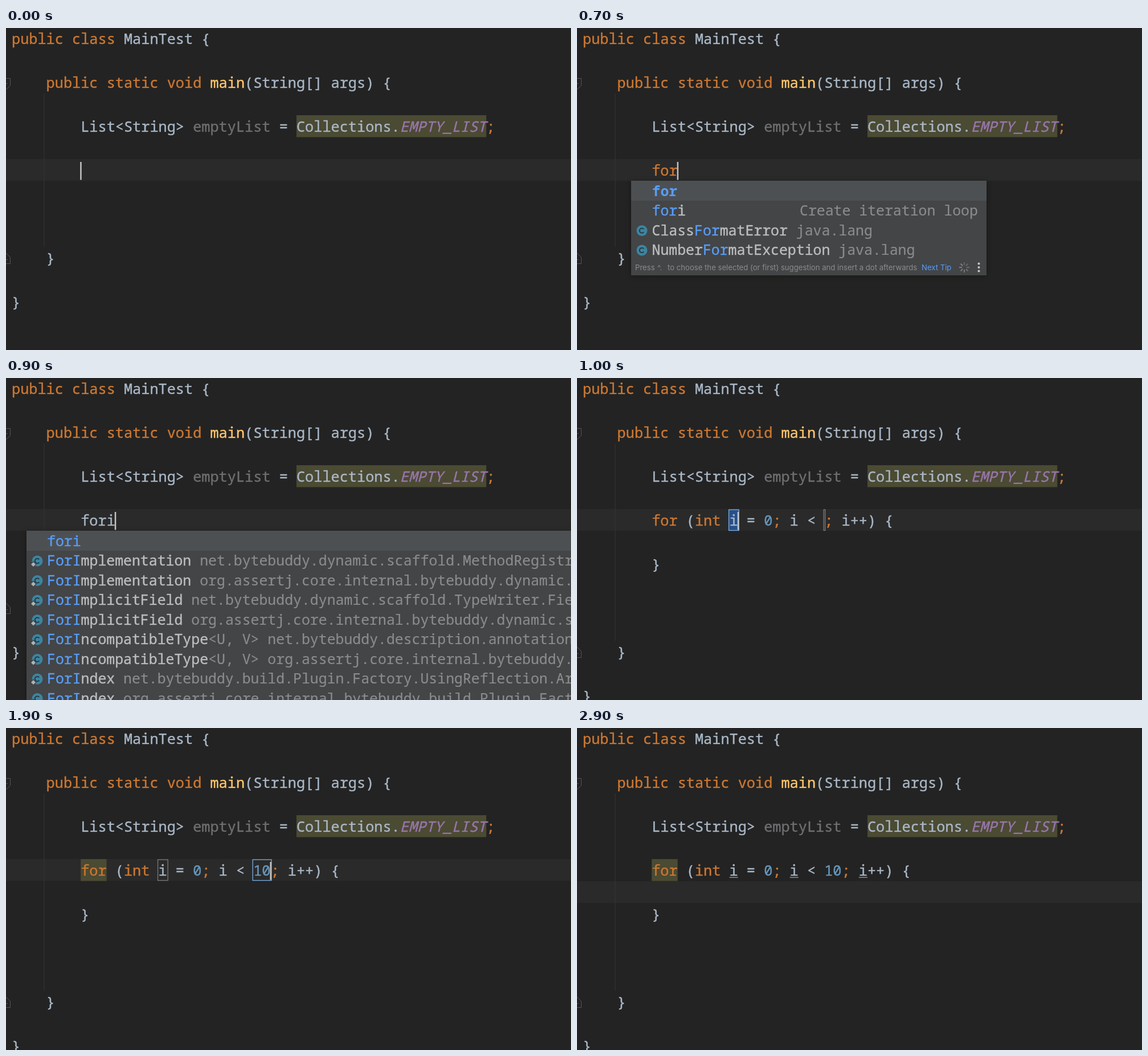
Recreate the animation shown at these times as an HTML page. Size 992 by 565 pixels, loop 3000 ms.

```html
<!DOCTYPE html>
<html lang="en">
<head>
<meta charset="utf-8">
<title>Typing a for loop</title>
<style>
  html, body { margin: 0; width: 100%; height: 100%; overflow: hidden; background: #232323; }
  svg { display: block; width: 992px; height: 565px; }
  text {
    white-space: pre; font: 25.25px "Noto Sans Mono", "DejaVu Sans Mono", monospace; font-variant-ligatures: none;
    color: #a9b7c6; fill: currentColor; stroke: currentColor; stroke-width: .4px;
  }
  .key { color: #cc7832; }
  .name { color: #ffc66d; }
  .unused { color: #6e6f71; }
  .num { color: #6897bb; }
  .const { color: #9876aa; font-style: italic; }
  .item { font-size: 24.83px; color: #bbbdbf; }
  .hit { color: #589df6; }
  .bold { font-weight: 700; stroke: none; }
  .dim { color: #8a8b8c; stroke-width: .2px; }
  .tip { font: 13.15px Inter, "Liberation Sans", sans-serif; color: #8a8b8c; stroke: none; }
  .link { color: #589df6; }
  .panel { filter: drop-shadow(0 1px 4px #0005); }
</style>
</head>
<body>
<svg id="stage" viewBox="0 0 992 565"></svg>
<script>
const LOOP = 3000;
const COL = 15.15, ROW = 38.5, ITEM_COL = 14.9;
const stage = document.getElementById('stage');

const colX = c => 10 + c * COL;
const rowY = r => Math.round(r * ROW - 1);
const esc = s => s.replace(/&/g, '&amp;').replace(/</g, '&lt;');
const rect = (x, y, w, h, fill, extra = '') =>
  `<rect x="${x}" y="${y}" width="${w}" height="${h}" fill="${fill}" ${extra}/>`;
const path = (d, stroke, width = 1) =>
  `<path d="${d}" fill="none" stroke="${stroke}" stroke-width="${width}"/>`;
const text = (x, y, s, cls = '') => `<text x="${x}" y="${y}" class="${cls}">${esc(s)}</text>`;

// Each run is [column, text, class].
const code = (row, ...runs) =>
  runs.map(([c, s, cls]) => text(colX(c), rowY(row) + 28.5, s, cls)).join('');
const mark = (row, c, n) => rect(colX(c), rowY(row), n * COL, ROW, '#4b4a33');
const caret = (row, c) => rect(colX(c) - 1, rowY(row) + 5, 2.5, 31.5, '#c4c4c4');
const field = (c, n, stroke, fill = 'none') =>
  rect(colX(c) - 1, rowY(6) + 1, n * COL + 2.5, ROW - 2, fill, `stroke="${stroke}" stroke-width="1.3"`);

function page(s) {
  const end = s.loop ? 12 : 10;
  const y = rowY(end);
  return rect(0, 0, 992, 565, '#232323') +
    rect(0, rowY(s.line || 6), 992, 38, '#2a2a2a') +
    path(`M67 ${rowY(3)}V${y}`, '#353535') +
    path('M0 88.5H7.5V101L0 108M0 97.5H3', '#555') +
    path(`M0 ${y + 11}L7.5 ${y + 18.5}V${y + 29.5}H0M0 ${y + 22.5}H3`, '#555') +
    code(0, [0, 'public class', 'key'], [13, 'MainTest {']) +
    code(2, [4, 'public static void', 'key'], [23, 'main', 'name'], [27, '(String[] args) {']) +
    mark(4, 33, 22) +
    code(4, [8, 'List<String>'], [21, 'emptyList', 'unused'], [31, '='],
      [33, 'Collections.'], [45, 'EMPTY_LIST', 'const'], [55, ';', 'key']) +
    code(end, [4, '}']) + code(end + 2, [0, '}']);
}

function forLoop(s) {
  const n = s.limit.length, after = 28 + n;
  const blue = '#78aee0', grey = '#797b7d';
  let out = s.warn ? mark(6, 8, 3) : '';
  if (s.slot === 1) out += field(17, 1, blue, '#27508a') + field(28, n, grey);
  if (s.slot === 2) out += field(17, 1, grey) + field(28, n, blue);
  out += code(6, [8, 'for', 'key'], [12, '('], [13, 'int', 'key'], [17, 'i ='], [21, '0', 'num'],
    [22, ';', 'key'], [24, 'i <'], [28, s.limit, 'num'], [after, ';', 'key'], [after + 2, 'i++) {']);
  if (s.warn && !n) out += path('M419 262.5l3.5 3 3.5-3 3.5 3 2.5-2.5', '#b5622b', 1.4);
  if (s.under) for (const c of [17, 24, after + 2])
    out += rect(colX(c), 261.5, COL, 1.3, '#929eab');
  return out + code(8, [8, '}']);
}

const classIcon = (x, y, nested) =>
  `<circle cx="${x}" cy="${y}" r="9.5" fill="#3d84a0"/>` +
  path(`M${x + 3.3} ${y - 2.6}a4.2 4.2 0 1 0 0 5.2`, '#25343c', 1.8) +
  (nested ? `<path d="M${x - 7} ${y + 1}l5 5-5 5-5-5z" fill="#aeb4b8" stroke="#434547" stroke-width="1.5"/>` : '');

// Each part of an entry is [text, class]; parts follow one another.
function entry(x, i, parts) {
  let n = 0;
  return parts.map(([s, cls = '']) => {
    const out = text(x + n * ITEM_COL, 294.7 + 34.5 * i, s, 'item ' + cls);
    n += s.length;
    return out;
  }).join('');
}

function panel(x, w, h) {
  return rect(x, 268, w, h, '#434547', 'class="panel"') + rect(x, 268, w, 35, '#4d5053');
}

function shortList() {
  let out = panel(95, 624, 166) +
    entry(131.5, 0, [['for', 'hit bold']]) +
    entry(131.5, 1, [['for', 'hit'], ['i']]) +
    entry(391, 1, [['Create iteration loop', 'dim']]) +
    entry(131.5, 2, [['Class'], ['For', 'hit'], ['matError '], ['java.lang', 'dim']]) +
    entry(131.5, 3, [['Number'], ['For', 'hit'], ['matException '], ['java.lang', 'dim']]) +
    classIcon(114, 355.5) + classIcon(114, 390) +
    text(102, 424.5, 'Press', 'tip') + text(141, 424.5, '^.', 'tip') +
    text(159, 424.5, 'to choose the selected (or first) suggestion and insert a dot afterwards', 'tip') +
    text(605, 424.5, 'Next Tip', 'tip link');
  for (let k = 0; k < 8; k++)
    out += `<path d="M680 416V411" stroke="#8d8f91" stroke-width="1.8" opacity="${0.45 + k * 0.07}" transform="rotate(${k * 45} 680 420)"/>`;
  for (const y of [413.5, 420, 426.5]) out += `<circle cx="705.5" cy="${y}" r="2" fill="#c4c6c8"/>`;
  return out;
}

const NET = 'net.bytebuddy.', ORG = 'org.assertj.core.internal.bytebuddy.';
const matches = [
  ['mplementation', '', 'dynamic.scaffold.MethodRegistry', 'dynamic.scaffold'],
  ['mplicitField', '', 'dynamic.scaffold.TypeWriter.FieldPool', 'dynamic.scaffold'],
  ['ncompatibleType', '<U, V>', 'description.annotation.AnnotationValue', 'description'],
  ['ndex', '', 'build.Plugin.Factory.UsingReflection.ArgumentResolver', 'build.Plugin.Factory']
];

function longList() {
  let out = panel(36, 956, 297) + entry(72, 0, [['fori', 'hit']]);
  matches.forEach(([name, generic, net, org], m) => {
    [NET + net, ORG + org].forEach((pack, k) => {
      const i = 1 + m * 2 + k;
      out += classIcon(55, 286.5 + 34.5 * i, true) +
        entry(72, i, [['ForI', 'hit'], [name], [generic + ' ' + pack, 'dim']]);
    });
  });
  return out;
}

const first = { loop: true, limit: '', slot: 1, caret: [6, 18] };
const second = { loop: true, limit: '', slot: 2, warn: true, caret: [6, 28] };
const full = { ...second, limit: '10', caret: [6, 30] };
const done = { loop: true, limit: '10', warn: true, under: true, line: 7 };

const steps = [
  [0, { caret: [6, 8] }],
  [100, {}],
  [400, { caret: [6, 8] }],
  [600, { typed: 'fo', caret: [6, 10] }],
  [700, { typed: 'for', cls: 'key', caret: [6, 11], list: shortList }],
  [900, { typed: 'fori', caret: [6, 12], list: longList }],
  [1000, first],
  [1200, { ...first, warn: true }],
  [1400, second],
  [1800, { ...second, limit: '1', caret: [6, 29] }],
  [1900, full],
  [2100, { ...full, under: true }],
  [2200, { ...done, caret: [7, 12] }],
  [2600, done]
];

function draw(s) {
  stage.innerHTML = page(s) +
    (s.loop ? forLoop(s) : '') +
    (s.typed ? code(6, [8, s.typed, s.cls]) : '') +
    (s.list ? s.list() : '') +
    (s.caret ? caret(...s.caret) : '');
}

const start = performance.now();
let shown = -1;
function tick() {
  const t = (performance.now() - start) % LOOP;
  let i = steps.length - 1;
  while (steps[i][0] > t) i--;
  if (i !== shown) draw(steps[shown = i][1]);
  requestAnimationFrame(tick);
}
tick();
</script>
</body>
</html>
```
